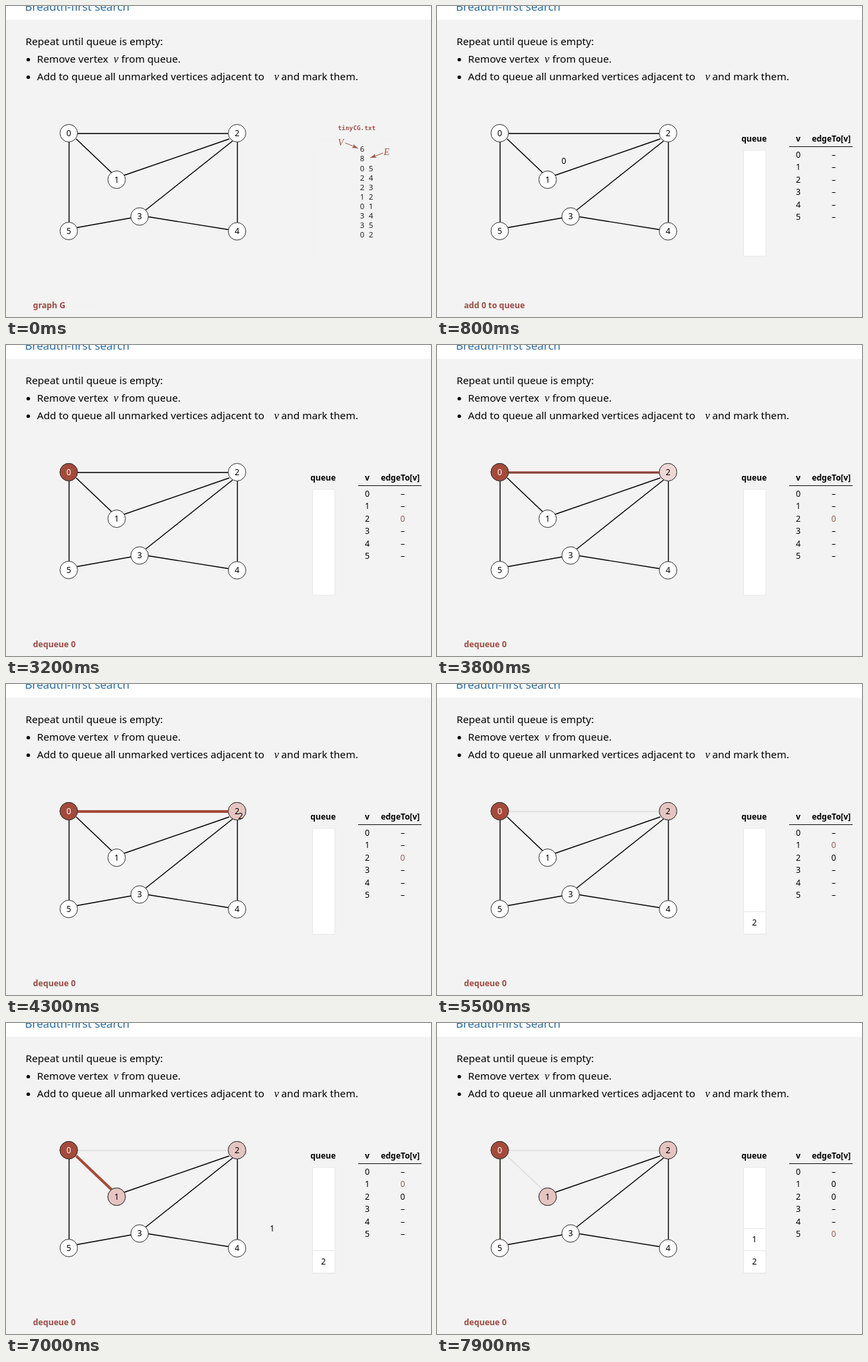
An HTML page that plays this animation: 630 by 461 pixels, repeating every 8000 ms.

```html
<!DOCTYPE html>
<html lang="en">
<head>
<meta charset="utf-8">
<title>Breadth-first search</title>
<style>
  html, body { margin: 0; height: 100%; overflow: hidden; background: #f3f3f3; }
  svg { display: block; width: 630px; height: 461px; }
  text { font: 12.3px "Noto Sans", sans-serif; fill: #000; }
  .hand { font-family: "Comic Sans MS", "Noto Sans", cursive; font-size: 15.2px; }
  .title { font-size: 16.7px; fill: #2d6c9f; }
  .math { font: italic 16px "Liberation Serif", serif; }
  .small { font-size: 14px; fill: #a5554b; }
  .bold { font-size: 12px; font-weight: bold; }
  .data { font-size: 11.3px; fill: #222; }
  .file { font: bold 9.3px "DejaVu Sans Mono", monospace; fill: #a5554b; }
  .caption { font-size: 12.2px; font-weight: bold; fill: #994c43; }
  .new { fill: #8f5c58; }
  .light { fill: #fff; }
</style>
</head>
<body>
<svg id="stage" viewBox="0 0 630 461"></svg>
<script>
const LOOP = 8000, MOVE = 780, RED = '#a54a3b', PINK = '#e6c5c1';
const stage = document.getElementById('stage');
const updates = [];

function add(tag, attrs, parent = stage) {
  const el = document.createElementNS('http://www.w3.org/2000/svg', tag);
  for (const name in attrs) el.setAttribute(name, attrs[name]);
  parent.append(el);
  return el;
}
const group = () => add('g', {});
function text(str, x, y, cls = '', anchor = 'start', parent = stage) {
  const el = add('text', { x, y, class: cls, 'text-anchor': anchor }, parent);
  el.textContent = str;
  return el;
}
const label = (str, x, y, cls, parent) => text(str, x, y + 4.4, cls, 'middle', parent);
const line = (x1, y1, x2, y2, stroke, width, parent) =>
  add('line', { x1, y1, x2, y2, stroke, 'stroke-width': width }, parent);

const ramp = (t, [start, end]) => Math.min(1, Math.max(0, (t - start) / (end - start)));
const ease = p => (1 - Math.cos(Math.PI * p)) / 2;
const NEVER = [1e6, 1e6 + 1], ALWAYS = [-2, -1];
function fade(el, enter, leave = NEVER) {
  updates.push(t => el.setAttribute('opacity', ramp(t, enter) * (1 - ramp(t, leave))));
  return el;
}

// Timing of the main steps
const SETUP = [0, 400], DEQUEUE = [1600, 1900], REMOVE = [2000, 2400];
const visits = [
  { v: 2, found: [3100, 3200], mark: [3400, 4000], done: [5400, 5490], move: 4200 },
  { v: 1, found: [5400, 5490], mark: [5700, 6300], done: [7500, 7600], move: 6480 },
  { v: 5, found: [7500, 7600], mark: [7880, 8480], done: NEVER }
];
const visitOf = v => visits.find(visit => visit.v === v);

// Heading and instructions
add('rect', { width: 630, height: 461, fill: '#f3f3f3' });
add('rect', { width: 630, height: 20.5, fill: '#fff' });
text('Breadth-first search', 28, 7, 'hand title');
text('Repeat until queue is empty:', 29, 57.5, 'hand');
for (const y of [79.5, 105.5]) add('circle', { cx: 33, cy: y, r: 2.6 });
text('Remove vertex', 46, 84, 'hand');
text('v', 159.5, 84, 'math');
text('from queue.', 171, 84, 'hand');
text('Add to queue all unmarked vertices adjacent to', 46, 110, 'hand');
text('v', 397.5, 110, 'math');
text('and mark them.', 408, 110, 'hand');

// Graph
const nodes = [[93, 188.5], [164, 257.5], [342.5, 188.5], [198, 312], [342.5, 334], [93, 333.5]];
const edges = [
  { ends: [93.5, 201, 93.5, 321], to: 5 },
  { ends: [104, 197, 157, 247.5], to: 1 },
  { ends: [106, 189, 330, 189], to: 2 },
  { ends: [343, 201, 343, 321] },
  { ends: [336, 200, 207, 302.5] },
  { ends: [175, 251, 331, 197] },
  { ends: [211, 312.5, 330, 331.5] },
  { ends: [105, 328.5, 186, 314] }
];
for (const { ends, to } of edges) {
  const visit = visitOf(to);
  if (visit) line(...ends, '#dcdcdc', 1.4);
  const plain = line(...ends, '#000', 1.4);
  if (visit) {
    const end = visit.mark[1];
    fade(plain, ALWAYS, [end, end + 50]);
    fade(line(...ends, RED, 4), visit.mark, visit.done);
  }
}
const disc = ([cx, cy], fill, parent) => add('circle', { cx, cy, r: 13, fill, stroke: '#333' }, parent);
nodes.forEach((p, v) => {
  disc(p, '#fff');
  const visit = visitOf(v);
  if (visit) fade(disc(p, PINK), visit.mark);
  label(v, ...p);
  if (v === 0) {
    const marked = fade(group(), DEQUEUE);
    disc(p, RED, marked);
    label(v, ...p, 'light', marked);
  }
});

// Input file
const file = fade(group(), ALWAYS, SETUP);
text('tinyCG.txt', 492, 184, 'file', 'start', file);
['6', '8', '0 5', '2 4', '2 3', '1 2', '0 1', '3 4', '3 5', '0 2'].forEach((row, i) =>
  row.split(' ').forEach((n, col) => label(n, 528 + 13 * col, 212 + 14.05 * i, 'data', file)));
function pointer(x1, y1, x2, y2) {
  line(x1, y1, x2, y2, '#a5554b', 1, file);
  const angle = Math.atan2(y2 - y1, x2 - x1) * 180 / Math.PI;
  add('path', { d: 'M0 0L-9 -3L-7 0L-9 3Z', fill: '#a5554b',
    transform: `translate(${x2} ${y2}) rotate(${angle})` }, file);
}
text('V', 492, 207, 'math small', 'start', file);
pointer(503, 203, 522, 211);
text('E', 560, 221, 'math small', 'start', file);
pointer(559, 218, 540, 225);

// Queue and table
const panel = fade(group(), SETUP);
text('queue', 470, 200.5, 'bold', 'middle', panel);
add('rect', { x: 454.5, y: 214, width: 33, height: 157, fill: '#fff', stroke: '#e8e8e8' }, panel);
text('v', 535.5, 200.5, 'bold', 'middle', panel);
text('edgeTo[v]', 584.5, 200.5, 'bold', 'middle', panel);
line(522, 208.5, 616, 208.5, '#111', 1, panel);
for (let v = 0; v < 6; v++) {
  const y = 220.5 + 18.5 * v, visit = visitOf(v);
  label(v, 535.5, y, '', panel);
  const dash = label('–', 588, y, '', panel);
  if (visit) {
    fade(dash, ALWAYS, visit.found);
    fade(label(0, 588, y, 'new', panel), visit.found, visit.done);
    fade(label(0, 588, y, '', panel), visit.done);
  }
}

// Vertices travelling into the queue
function enqueue(v, start, slot, leave) {
  const [x, y] = nodes[v], toX = 470.5, toY = 353.5 - 33 * slot, landed = start + MOVE;
  fade(add('rect', { x: 454.5, y: toY - 16, width: 33, height: 33, fill: '#fff', stroke: '#e8e8e8' }),
    [landed + 50, landed + 150], leave);
  const mover = fade(label(v, 0, 0), [start, start + 1], leave);
  updates.push(t => {
    const p = ease(ramp(t, [start, landed]));
    mover.setAttribute('transform', `translate(${x + (toX - x) * p} ${y + (toY - y) * p})`);
  });
}
enqueue(0, 540, 0, REMOVE);
enqueue(2, visits[0].move, 0);
enqueue(1, visits[1].move, 1);

// Captions
const caption = (str, enter, leave) => fade(text(str, 40, 447.5, 'caption'), enter, leave);
caption('graph G', ALWAYS, SETUP);
caption('add 0 to queue', SETUP, DEQUEUE);
caption('dequeue 0', DEQUEUE);

function frame() {
  const t = performance.now() % LOOP;
  for (const update of updates) update(t);
  requestAnimationFrame(frame);
}
frame();
</script>
</body>
</html>
```
